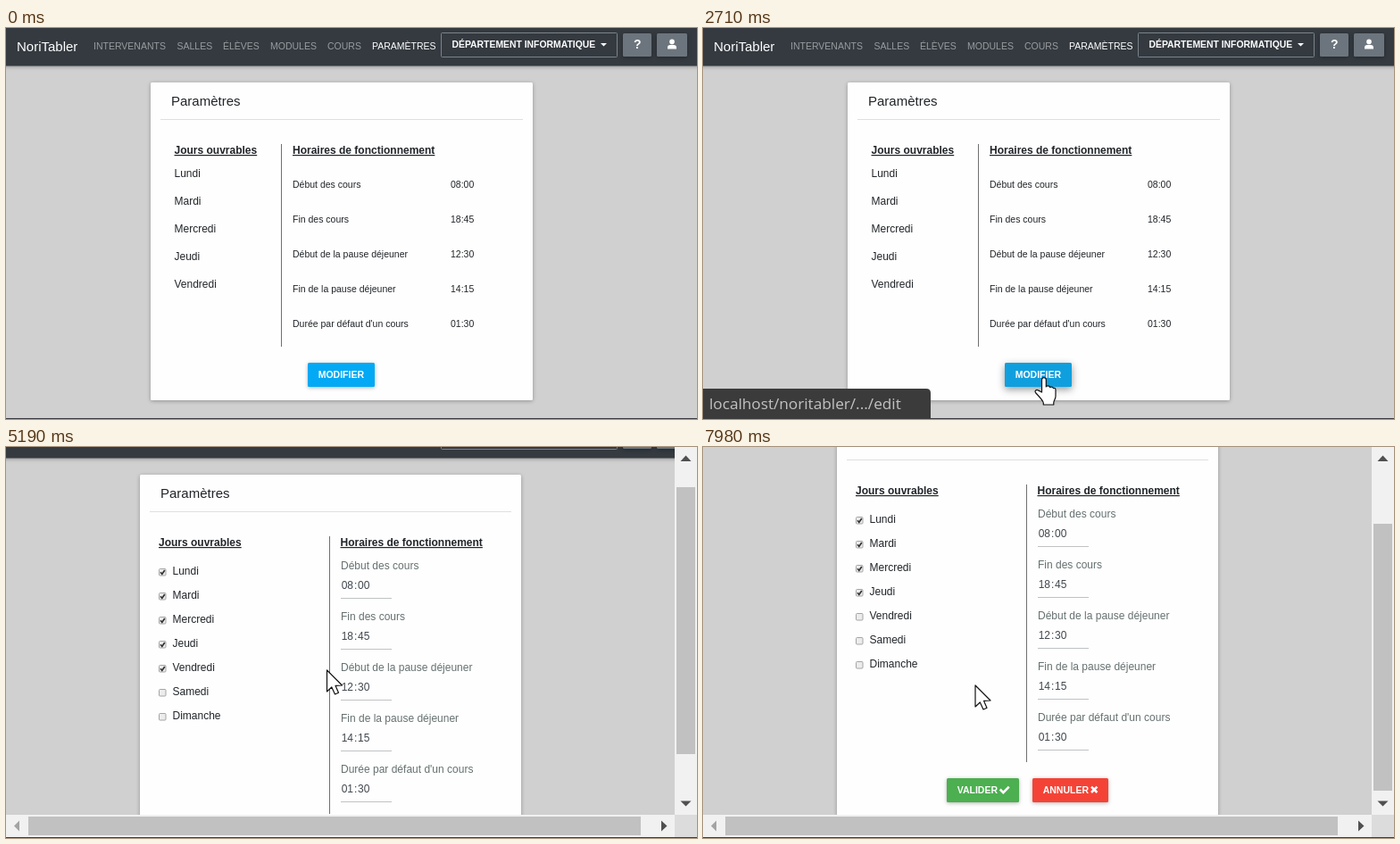
An HTML page for the animation above (8000 ms loop, 774x438 px).

```html
<!DOCTYPE html>
<html lang="fr">
<head>
<meta charset="utf-8">
<title>Paramètres</title>
<style>
html, body { margin: 0; width: 100%; height: 100%; overflow: hidden; background: #d0d0d0; }
svg { display: block; width: 774px; height: 438px; }
text { font-family: "Liberation Sans", Arial, sans-serif; fill: #212529; white-space: pre; }
.bold { font-weight: bold; }
.head { font-weight: bold; text-decoration: underline; }
.url { font-family: "Open Sans", "Noto Sans", sans-serif; }
.lift { filter: drop-shadow(0 1.5px 2px rgba(0, 0, 0, .3)); }
.high { filter: drop-shadow(0 3px 4px rgba(0, 0, 0, .4)); }
</style>
</head>
<body>
<svg id="stage" viewBox="0 0 774 438" xmlns="http://www.w3.org/2000/svg"></svg>
<script>
const LOOP = 8000;
const DAYS = ["Lundi", "Mardi", "Mercredi", "Jeudi", "Vendredi", "Samedi", "Dimanche"];
const HOURS = [
  ["Début des cours", "08:00"],
  ["Fin des cours", "18:45"],
  ["Début de la pause déjeuner", "12:30"],
  ["Fin de la pause déjeuner", "14:15"],
  ["Durée par défaut d'un cours", "01:30"]
];

const text = (x, y, s, size = 12, fill = "#212529", cls = "") =>
  `<text x="${x}" y="${y}" font-size="${size}" style="fill:${fill}" class="${cls}">${s}</text>`;
const rect = (x, y, w, h, fill, extra = "") =>
  `<rect x="${x}" y="${y}" width="${w}" height="${h}" fill="${fill}" ${extra}/>`;
const path = (d, fill, extra = "") => `<path d="${d}" fill="${fill}" ${extra}/>`;
const button = (x, y, w, fill, label, id = "") =>
  rect(x, y, w, 27, fill, `rx="1.5" class="lift" ${id}`) +
  text(x + 11.7, y + 17, label, 10.5, "#fff", "bold");

function navbar() {
  const links = [["INTERVENANTS", 98], ["SALLES", 191.5], ["ÉLÈVES", 243],
    ["MODULES", 296], ["COURS", 360], ["PARAMÈTRES", 410]];
  return rect(-5, -60, 784, 102.5, "#343a40", 'class="lift"') +
    text(12, 25.5, "NoriTabler", 15, "#fff") +
    links.map(([s, x], i) => text(x, 24, s, 10.5, i === 5 ? "#fff" : "#999c9f")).join("") +
    rect(487.5, 5.5, 197, 27, "none", 'stroke="#7b848b" rx="1"') +
    text(499.5, 22, "DÉPARTEMENT INFORMATIQUE", 10.4, "#fff", "bold") +
    path("M666 17h7l-3.5 3.5z", "#fff") +
    rect(691, 6, 32, 26, "#6c757d", 'rx="1.5" class="lift"') +
    text(703, 22.5, "?", 14, "#fff", "bold") +
    rect(729, 6, 34, 26, "#6c757d", 'rx="1.5" class="lift"') +
    '<circle cx="746" cy="15.4" r="2.8" fill="#fff"/>' +
    path("M741 23.5v-1.6q0-3 3-3h4q3 0 3 3v1.6z", "#fff");
}

function card(x, w, h, xDays, xHours, xLine, lineH) {
  return rect(x, 61, w, h, "#fefefe", 'rx="1.5" class="lift"') +
    text(x + 23, 87, "Paramètres", 15) +
    rect(x + 11, 102, w - 22, 1, "#dfdfdf") +
    text(xDays, 141, "Jours ouvrables", 12, "#212529", "head") +
    text(xHours, 141, "Horaires de fonctionnement", 12, "#212529", "head") +
    rect(xLine, 130, 1, lineH, "#707070");
}

function viewPage() {
  return card(162, 428, 356, 188.5, 321, 308, 227) +
    DAYS.slice(0, 5).map((d, i) => text(188.5, 167 + 31 * i, d)).join("") +
    HOURS.map(([label, hour], i) =>
      text(321, 179 + 39 * i, label, 10.5) + text(498, 179 + 39 * i, hour, 10.5)).join("") +
    button(338, 375, 75, "#03a9f4", "MODIFIER", 'id="modify"') +
    '<clipPath id="face"><rect x="338" y="375" width="75" height="27" rx="1.5"/></clipPath>' +
    '<g clip-path="url(#face)"><circle id="ripple" cx="379" cy="391" fill="#fff"/></g>';
}

function checkbox(y, i) {
  return rect(171.5, y, 7.5, 7.5, "#ececec", 'stroke="#a5a5a5" rx="1"') +
    (i < 5 ? path(`M173 ${y + 3.8}l1.8 2 3-4.3`, "none",
      `id="tick${i}" stroke="#333" stroke-width="1.7"`) : "");
}

function editPage() {
  return card(150, 427, 440, 171, 374.5, 362, 311) +
    DAYS.map((d, i) => checkbox(166.5 + 27 * i, i) + text(186.5, 173 + 27 * i, d)).join("") +
    HOURS.map(([label, hour], i) => {
      const y = 57 * i, [h, m] = hour.split(":");
      return text(375, 167 + y, label, 12, "#667070") +
        text(375.7, 189 + y, h, 12, "#40474e") + text(390, 189 + y, ":", 12, "#40474e") +
        text(394, 189 + y, m, 12, "#40474e") + rect(375, 199 + y, 57, 1, "#bfc2c4");
    }).join("") +
    button(273, 459, 81, "#4caf50", "VALIDER") +
    path("M332.7 471.5l3.6 3.7 6.4-6.6", "none", 'stroke="#fff" stroke-width="2.6"') +
    button(369, 459, 85, "#f44336", "ANNULER") +
    path("M435 468.6l6.4 6.4m0-6.4l-6.4 6.4", "none", 'stroke="#fff" stroke-width="2.6"');
}

function scrollbars() {
  return rect(749, 0, 25, 412, "#f1f1f1") + rect(0, 412, 749, 26, "#f1f1f1") +
    rect(749, 412, 25, 26, "#dcdcdc") +
    rect(751, 24, 21, 299, "#c1c1c1", 'id="thumb"') + rect(25, 414, 686, 21, "#c1c1c1") +
    path("M755.5 16h12l-6-6.5z", "#a3a3a3", 'id="up"') +
    path("M755.5 396.5h12l-6 6z", "#505050") +
    path("M15 418.5v12l-6-6z", "#a3a3a3") + path("M734 418.5v12l6.5-6z", "#505050");
}

const stage = document.getElementById("stage");
stage.innerHTML = rect(0, 0, 774, 438, "#d0d0d0") +
  `<g id="page">${navbar()}<g id="view">${viewPage()}</g><g id="edit">${editPage()}</g></g>` +
  `<g id="bars">${scrollbars()}</g>` + rect(0, 437, 774, 1, "#3b3a40") +
  `<g id="status">${path("M0 404h250q5 0 5 5v29H0z", "#3b3b3b")}` +
  text(7, 427, "localhost/noritabler/.../edit", 17.2, "#c2c2c2", "url") + "</g>" +
  '<g id="cursor" fill="#fff" stroke="#111" stroke-width="1.2" stroke-linejoin="round">' +
  '<path id="arrow" d="M0 0V24L5.3 19 9 27 13 25.3 9.6 17.4 17 17z"/>' +
  '<path id="hand" transform="translate(-8 0)" d="M8.5 17V3a2.4 2.4 0 0 1 4.8 0v8c.3-1.5 4-1.5 4.4.6' +
  'c.6-1 3.4-.8 3.8 1c1-.8 2.5 0 2.5 2v7c0 3-2.2 5-2.2 7v2.4H10.3v-2c0-2-5-7.5-8.8-11.5' +
  'c-1.5-2 1-4 3-2.6z"/></g>';

const $ = id => document.getElementById(id);
const show = (id, on) => $(id).setAttribute("display", on ? "inline" : "none");
const set = (id, name, value) => $(id).setAttribute(name, value);

// Share of n equal steps done between t0 and t1; the first lands at t0.
const steps = (t, t0, t1, n) =>
  t < t0 ? 0 : n < 2 ? 1 : Math.min(n, Math.floor((t - t0) / (t1 - t0) * (n - 1) + 1e-6) + 1) / n;

// Pointer moves: start, end, steps, from, control, to.
const MOVES = [
  [300, 380, 2, [607, 315], [597, 300], [587, 285]],
  [690, 1400, 10, [587, 285], [462, 101], [337, 340]],
  [1500, 1950, 7, [337, 340], [360, 360], [379, 391]],
  [3640, 3940, 5, [379, 391], [253, 320], [359.5, 250]],
  [6290, 6830, 8, [359.5, 250], [270, 170], [212, 195]],
  [6980, 6980, 1, [212, 195], [210, 194], [208, 193]],
  [7057, 7750, 10, [208, 193], [262, 129], [310, 262]],
  [7830, 7980, 3, [310, 262], [307, 265], [305, 267]]
];

function pointer(t) {
  const move = MOVES.filter(m => t >= m[0]).pop();
  if (!move) return null;
  const [t0, t1, n, a, c, b] = move, p = steps(t, t0, t1, n), q = 1 - p;
  return [0, 1].map(k => q * q * a[k] + 2 * p * q * c[k] + p * p * b[k]);
}

// Scroll offset held from each time on.
const SCROLL = [[0, 0], [4260, 9], [4345, 60], [4430, 88], [5190, 30], [5280, 0],
  [5740, 2], [5817, 32], [5893, 74], [5970, 88]];

function draw(t) {
  const editing = t >= 2930;
  show("view", !editing);
  show("edit", editing);
  show("bars", editing);

  const y = SCROLL.filter(s => t >= s[0]).pop()[1];
  set("page", "transform", `translate(0 ${-y})`);
  set("thumb", "y", 24 + Math.round(y * 0.704));
  set("up", "fill", y ? "#505050" : "#a3a3a3");
  show("tick4", t < 7057);

  const hover = t >= 1875;
  set("modify", "fill", hover ? "#0098dc" : "#03a9f4");
  set("modify", "class", hover ? "high" : "lift");
  const wave = steps(t, 2390, 2710, 5);
  set("ripple", "r", 45 * wave);
  set("ripple", "opacity", wave ? 0.32 * (1.2 - wave) : 0);

  show("status", t >= 2090 && t < 3010);
  set("status", "opacity", editing ? 0.5 : t < 2160 ? 0.85 : 1);

  const at = pointer(t), hand = hover && t < 3640;
  show("cursor", at);
  show("hand", hand);
  show("arrow", !hand);
  if (at) set("cursor", "transform", `translate(${at[0].toFixed(1)} ${at[1].toFixed(1)})`);
}

const start = performance.now();
function tick() {
  draw((performance.now() - start) % LOOP);
  requestAnimationFrame(tick);
}
tick();
</script>
</body>
</html>
```
